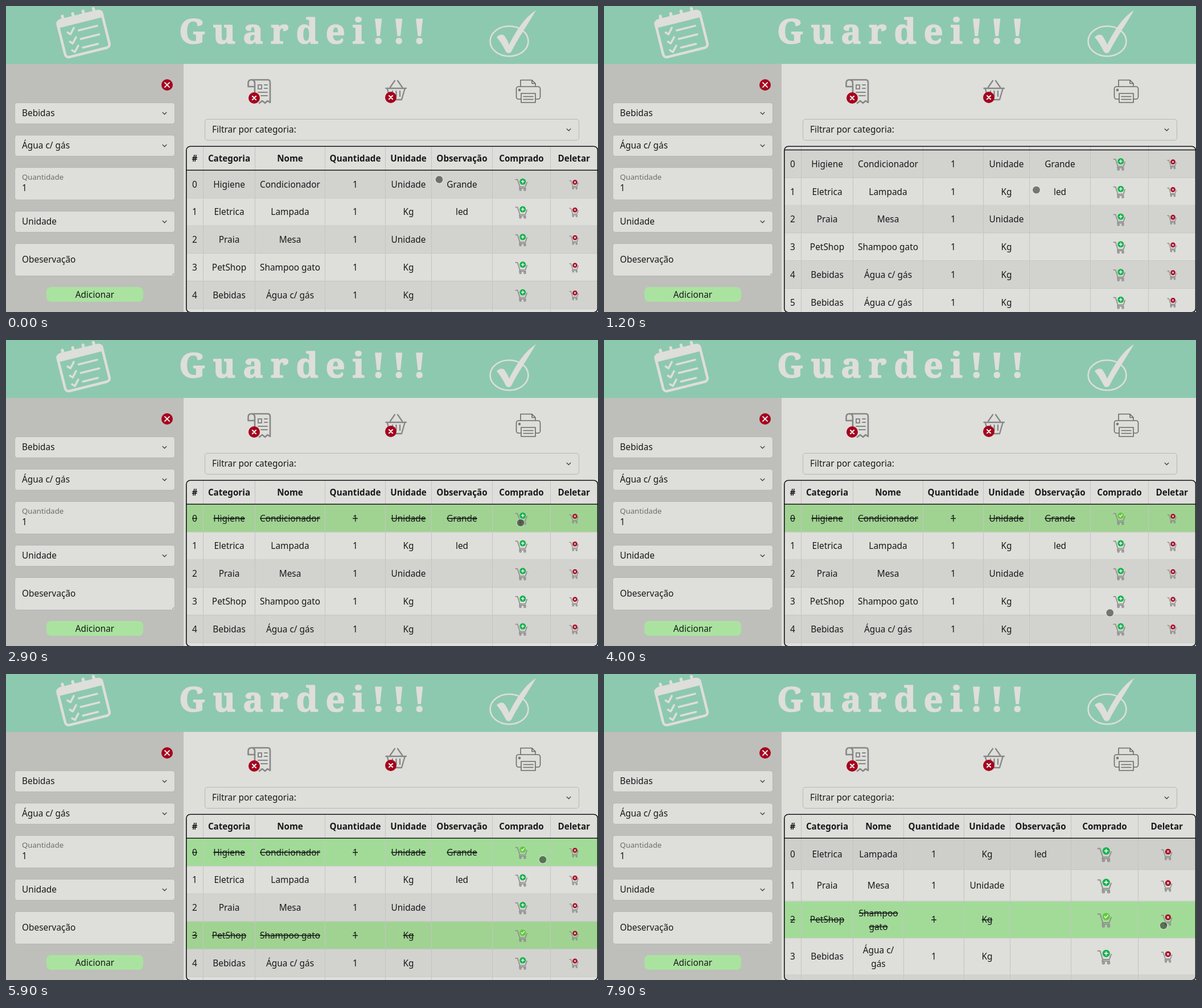
These frames come from a looping animation (1040x539 px, 8000 ms). An HTML page:

```html
<!DOCTYPE html>
<html lang="pt">
<head>
<meta charset="utf-8">
<title>Lista de compras</title>
<style>
html, body { margin: 0; width: 100%; height: 100%; overflow: hidden; background: #dededa; }
svg { display: block; width: 1040px; height: 539px; }
text { font: 15.4px "Noto Sans", "Open Sans", sans-serif; fill: #17181a; }
.mid, .mid text { text-anchor: middle; }
.th { font-weight: 700; font-size: 15.2px; }
.small { font-size: 13.2px; fill: #6c6d6c; }
.title { font: 800 60px "Noto Serif", "DejaVu Serif", serif; letter-spacing: 13px; fill: #dededa; stroke: #dededa; stroke-width: 1.6; stroke-linejoin: round; }
.line { fill: none; stroke-linecap: round; stroke-linejoin: round; }
.field { fill: #dededa; stroke: #b6b8b6; }
.bg { fill: #dededa; }
.odd .bg { fill: #d2d3cf; }
.hover .bg { fill: #cecfcb; }
.done .bg { fill: #a0d391; }
.done.lit .bg { fill: #a2db98; }
.done text { text-decoration: line-through; }
.tick, .checked .plus { display: none; }
.checked .tick { display: inline; }
</style>
</head>
<body>
<svg viewBox="0 0 1040 539">
  <defs>
    <clipPath id="frame"><rect x="316" y="247" width="723.5" height="300" rx="7"/></clipPath>
    <g id="cart" class="line" stroke="#8f908f" stroke-width="1.9">
      <path d="M1 2.5H4.5L9 16.5H19.5L22.5 8M9 16.5L8 19H20"/>
      <circle cx="10" cy="22" r="1.6"/><circle cx="18.5" cy="22" r="1.6"/>
    </g>
    <g id="cross"><circle r="10" fill="#a6001c"/><path class="line" d="M-3 -3L3 3M3 -3L-3 3" stroke="#eee" stroke-width="2.4"/></g>
    <path id="chevron" class="line" d="M-3.4 -1.6L0 1.8L3.4 -1.6" stroke="#343a40" stroke-width="1.3"/>
  </defs>

  <rect width="1040" height="539" fill="#dededa"/>
  <rect y="102" width="312" height="437" fill="#bebfbb"/>
  <rect width="1040" height="102" fill="#8dc9af"/>
  <text class="title" x="304" y="66">Guardei!!!</text>

  <g class="line" transform="translate(135.5 48.5) rotate(-14) scale(1.04)" stroke="#dededa" stroke-width="4.4">
    <rect x="-38" y="-31" width="77" height="64" rx="6"/>
    <path d="M-37 -27H38M-37 -22H38" stroke-width="6"/>
    <path d="M-27 -37V-29M-9 -37V-29M9 -37V-29M27 -37V-29" stroke-width="5"/>
    <path d="M-25 -8l4 4 8 -9M-25 8l4 4 8 -9M-25 23l4 4 8 -9M-6 -7H26M-6 8H26M-6 23H20" stroke-width="3.4"/>
  </g>
  <g fill="#dededa">
    <ellipse cx="884" cy="62" rx="33.5" ry="26.5" fill="none" stroke="#dededa" stroke-width="2.6"/>
    <path d="M862 55C866 50 873 49 876 53Q881 60 884 68C896 44 911 20 931 7.500C917 32 900 56 888 80C886 84 880 84 878 80Q870 64 862 55Z"/>
  </g>

  <g id="form"></g>
  <g transform="translate(283 139)"><circle r="10" fill="#a6001c"/><path class="line" d="M-4 -4L4 4M4 -4L-4 4" stroke="#eee" stroke-width="1.800"/></g>
  <rect x="71" y="495" width="170" height="26" rx="8" fill="#aae39f"/>
  <text class="mid" x="156" y="513.500">Adicionar</text>

  <g class="line" stroke="#858686" stroke-width="2.600">
    <path d="M431 130H460Q464 130 464 135V170L459.500 167 455 171 450 167 445 171M437 152V136Q437 130 431 130 425.500 130 425.500 136V142H437"/>
    <path d="M443 139H449V146H443ZM454 139H459M454 145H459M443 152H459M448 158H459" stroke-width="2"/>
  </g>
  <use href="#cross" x="436" y="162"/>
  <g class="line" stroke="#858686" stroke-width="2.300">
    <path d="M667.500 145H703M670 146L675 165H695L700.500 146M675 143L683 131.500M696 143L688 131.500"/>
    <path d="M679 150V159M685.500 150V159M692 150V159"/>
  </g>
  <use href="#cross" x="676" y="161"/>
  <g class="line" stroke="#6a6b6a" stroke-width="1.600">
    <path d="M904 141V130.500H924L930 136.500V141M924 131V136.500H930"/>
    <rect x="896.500" y="142" width="42" height="22" rx="4"/>
    <rect x="905" y="154" width="25" height="16" fill="#dededa"/>
    <path d="M909 159.500H926M909 164.500H926"/><circle cx="902" cy="148" r="1.4"/>
  </g>

  <g clip-path="url(#frame)">
    <g id="before" class="mid"></g>
    <g id="after" class="mid"></g>
  </g>
  <rect x="316.800" y="247.200" width="722.700" height="292.500" rx="7" fill="none" stroke="#141518" stroke-width="1.600"/>
  <g id="cursor"><circle r="6.800" fill="#1c1c1c" fill-opacity=".54"/><circle r="6.900" fill="none" stroke="#f4f4f0" stroke-opacity=".6" stroke-width="1.300"/></g>
</svg>
<script>
const $ = id => document.getElementById(id);
const text = (x, y, s, cls = '') => `<text class="${cls}" x="${x}" y="${y}">${s}</text>`;

// Form fields
function field(x, y, w, h, label, select) {
  const c = y + h / 2;
  return `<rect class="field" x="${x}" y="${y}" width="${w}" height="${h}" rx="4.5"/>` +
    (label ? text(x + 12.5, c + 5, label) : '') +
    (select ? `<use href="#chevron" x="${x + w - 18}" y="${c}"/>` : '');
}
const side = (y, h, label, select) => field(15.5, y, 281, h, label, select);
$('form').innerHTML =
  side(170.5, 37, 'Bebidas', true) +
  side(227.5, 37, 'Água c/ gás', true) +
  side(284.5, 57) + text(28, 306, 'Quantidade', 'small') + text(28, 326, '1') +
  side(361.5, 37, 'Unidade', true) +
  side(418.5, 57, 'Obeservação') +
  '<path d="M292 474l3 -3" stroke="#777"/>' +
  field(349.5, 199.5, 657, 37, 'Filtrar por categoria:', true);

// Table
const HEAD = ['#', 'Categoria', 'Nome', 'Quantidade', 'Unidade', 'Observação', 'Comprado', 'Deletar'];
const ITEMS = [
  ['Higiene', 'Condicionador', 1, 'Unidade', 'Grande'],
  ['Eletrica', 'Lampada', 1, 'Kg', 'led'],
  ['Praia', 'Mesa', 1, 'Unidade', ''],
  ['PetShop', 'Shampoo gato', 1, 'Kg', ''],
  ['Bebidas', 'Água c/ gás', 1, 'Kg', ''],
  ['Bebidas', 'Água c/ gás', 1, 'Kg', '']
];
const BADGE = {
  plus: ['#12b34c', 'M-2.6 0H2.6M0 -2.6V2.6'],
  tick: ['#63c93d', 'M-2.8 0L-.8 2.2L2.8 -2.2'],
  del: ['#a6001c', 'M-1.8 -1.8L1.8 1.8M1.8 -1.8L-1.8 1.8']
};

function cart(x, y, size, kinds) {
  const badges = kinds.map(k => `<g class="${k}" transform="translate(14.5 6.5)"><circle r="6" fill="${BADGE[k][0]}"/>` +
    `<path class="line" d="${BADGE[k][1]}" stroke="#eee" stroke-width="1.7"/></g>`).join('');
  return `<g transform="translate(${x - size / 2} ${y - size / 2}) scale(${size / 24})"><use href="#cart"/>${badges}</g>`;
}

// A narrow name column wraps its text and frees room for larger carts
function table(items, nameWidth, buyWidth, rowHeight, cartSize, wrap) {
  const widths = [30, 91, nameWidth, 106, 81, 107, buyWidth];
  let x = 316.5, top = 290;
  const edges = widths.map(w => x += w);
  const mid = [...edges, 1039].map((e, i) => (e + (edges[i - 1] || 316.5)) / 2);
  let out = HEAD.map((h, i) => text(mid[i], 274, h, 'th')).join('');
  items.forEach((item, r) => {
    const split = wrap && item[1].includes(' ');
    const h = split ? 65 : rowHeight, c = top + h / 2;
    const cells = [r, ...item].map((s, i) => {
      if (!split || i !== 2) return text(mid[i], c + 5.3, s);
      const cut = s.lastIndexOf(' ');
      return text(mid[i], c - 6.5, s.slice(0, cut)) + text(mid[i], c + 17.5, s.slice(cut + 1));
    }).join('');
    out += `<g class="row ${r % 2 ? '' : 'odd'}"><rect class="bg" x="317" y="${top}" width="723" height="${h}"/>${cells}` +
      cart(mid[6], c, cartSize, ['plus', 'tick']) + cart(mid[7], c, cartSize * .78, ['del']) +
      `<path d="M317 ${top + h - .5}H1040" stroke="#c3c5c4"/></g>`;
    top += h;
  });
  const lines = edges.map(e => `M${e} 248V${top}`).join('');
  return `${out}<path d="${lines}" stroke="#c3c5c4"/><path d="M317 289.3H1040" stroke="#141518" stroke-width="1.5"/>`;
}

const before = $('before'), after = $('after'), cursor = $('cursor');
before.innerHTML = table(ITEMS, 123, 102, 48.75, 22);
after.innerHTML = table(ITEMS.slice(1), 89, 118, 55.3, 26, true);
const rows = before.querySelectorAll('.row'), later = after.querySelectorAll('.row');
later[0].classList.add('hover');
later[2].classList.add('done', 'checked', 'lit');

// Cursor moves: start, end, x, y
const MOVES = [
  [900, 1200, 759.5, 324], [1200, 1900, 836, 332], [1900, 2700, 904, 322],
  [3100, 3700, 864, 500], [3700, 4100, 897, 474], [4300, 4400, 904, 468.5], [4700, 4800, 899, 488],
  [5300, 5600, 785, 400], [5600, 5700, 900, 358], [5800, 5900, 943, 327], [5900, 6300, 984, 317],
  [6900, 7300, 912, 530], [7300, 7900, 983, 443]
];

const clamp = p => Math.min(1, Math.max(0, p));
const ease = p => p * p * (3 - 2 * p);
const span = (t, from, to) => clamp((t - from) / (to - from));

function cursorAt(t) {
  return MOVES.reduce(([x, y], [from, to, nx, ny]) => {
    const p = span(t, from, to);
    return [x + (nx - x) * p, y + (ny - y) * p];
  }, [761, 305.7]);
}

function draw(now) {
  const t = Math.floor(now % 8000 / 100) * 100;
  const set = (row, cls, from) => rows[row].classList.toggle(cls, t >= from);
  set(0, 'done', 2900);
  set(0, 'checked', 3200);
  set(0, 'lit', 4700);
  set(3, 'done', 4700);
  set(3, 'checked', 4700);
  before.style.display = t < 6500 ? '' : 'none';
  after.style.display = t < 6500 ? 'none' : '';
  const scroll = 41 * (ease(span(t, 400, 800)) - ease(span(t, 1000, 1900)));
  before.setAttribute('transform', `translate(0 ${-scroll})`);
  cursor.setAttribute('transform', `translate(${cursorAt(t)})`);
}

const start = performance.now();
function tick() {
  draw(performance.now() - start);
  requestAnimationFrame(tick);
}
tick();
</script>
</body>
</html>
```
